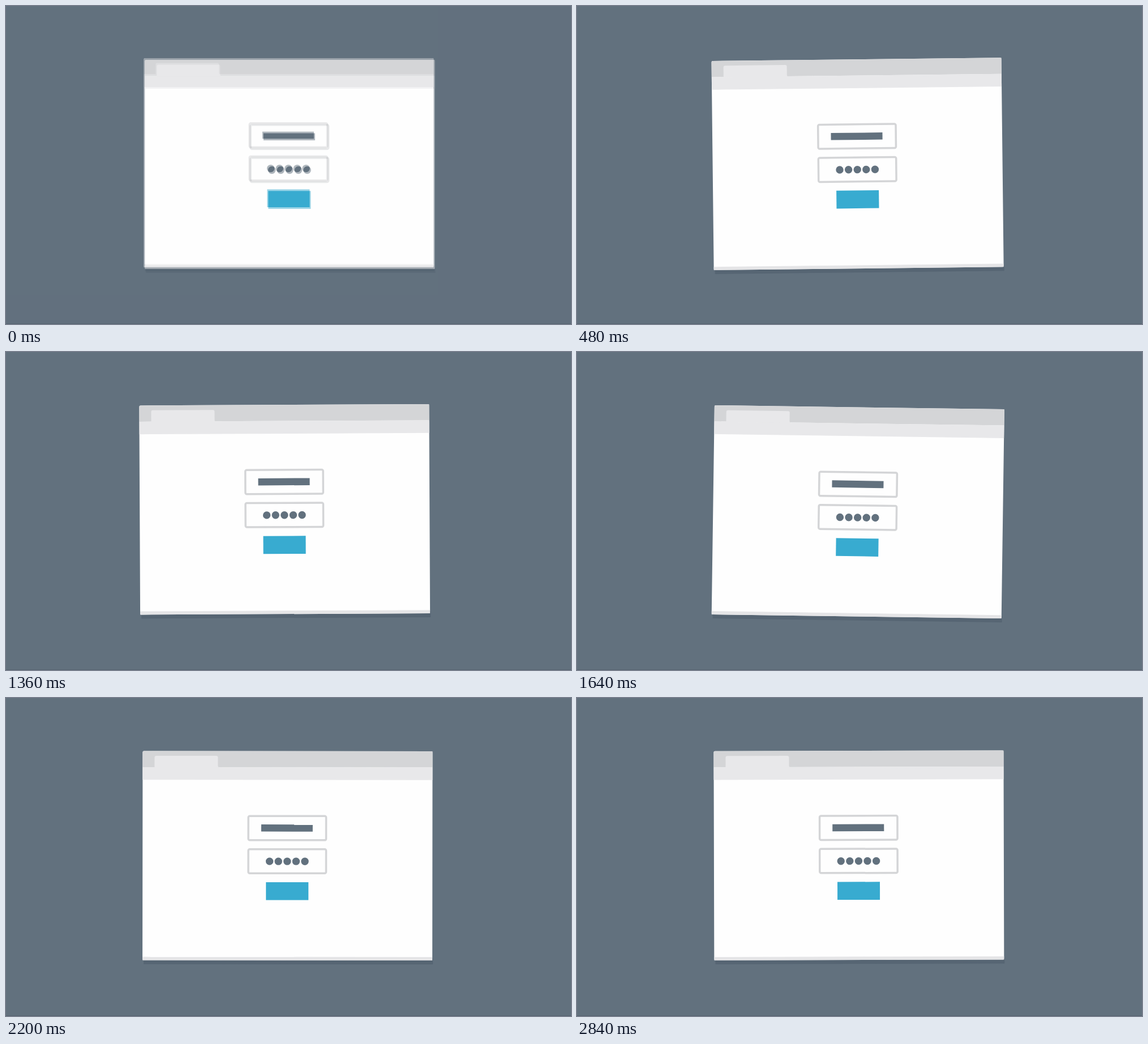
An HTML page for the animation above (2.88 s loop, 998 by 561 pixels).

```html
<!DOCTYPE html>
<html lang="en">
<head>
<meta charset="utf-8">
<title>Shaking login window</title>
<style>
  html, body { margin: 0; width: 100%; height: 100%; overflow: hidden; background: #62717e; }
  svg { display: block; width: 100vw; height: 100vh; }
</style>
</head>
<body>
<svg id="stage" viewBox="0 0 998 561"></svg>
<script>
const LOOP = 2880, STEP = 40;
const SLATE = '#62717e', BAR = '#d4d5d7', PALE = '#e8e8ea', BLUE = '#38abd0';

const rect = (x, y, w, h, fill, extra = '') =>
  `<rect x="${x}" y="${y}" width="${w}" height="${h}" fill="${fill}" ${extra}/>`;

const field = y =>
  rect(-69.2, y + 1.75, 137.4, 42.5, 'none', `rx="2.5" stroke="${BAR}" stroke-width="3.5"`);

const dots = [0, 1, 2, 3, 4].map(i =>
  `<circle cx="${-31.7 + 15.6 * i}" cy="10" r="6.7" fill="${SLATE}"/>`).join('');

// The window is drawn around its own centre.
const windowArt =
  rect(-254, 180, 511, 11.5, '#566573') +
  rect(-256, -184.5, 512, 369, '#fefefe', 'rx="2"') +
  `<path d="M-256-156V-181.5q0-3 3-3H256V-156z" fill="${BAR}"/>` +
  rect(-256, -156, 512, 22.3, PALE) +
  `<path d="M-235-155V-173q0-3 3-3h106q3 0 3 3v15q0 2 3 3z" fill="${PALE}"/>` +
  rect(-256, 178.7, 512, 5.8, '#e5e5e7') +
  field(-71.6) + field(-13.2) +
  rect(-46.5, -55, 91, 12.5, SLATE) + dots +
  rect(-38, 46.8, 75, 31.6, BLUE);

const layer = `<g>${rect(0, 0, 998, 561, SLATE)}<g>${windowArt}</g></g>`;
const stage = document.getElementById('stage');
stage.innerHTML = layer + layer + rect(0, 560, 998, 1, '#56636f');
const [main, ghost] = stage.children;

// Resting poses: time, centre x, centre y, degrees.
const poses = [
  [0, 499.3, 276.6, 0],
  [480, 495.6, 278.6, -0.64],
  [880, 502.2, 278.7, -0.52],
  [1360, 492.2, 277.7, -0.27],
  [1920, 495.5, 276.8, 0.29],
  [2440, 497.9, 277.8, 0.66],
  [2800, 495.5, 276.2, 0.2],
  [2840, 497.9, 277.6, -0.14]
];

// Wiggle keys fill the gaps between the poses.
const keys = [];
poses.forEach((pose, i) => {
  keys.push(pose);
  const next = poses[i + 1];
  if (!next) return;
  const gap = next[0] - pose[0], parts = Math.round(gap / 130);
  for (let k = 1; k < parts; k++) {
    const n = keys.length;
    keys.push([
      pose[0] + gap * k / parts,
      497.8 + 7 * Math.sin(2.4 * n),
      277.8 + 5 * Math.sin(2.9 * n + 1),
      0.8 * Math.sin(1.9 * n + 2)
    ]);
  }
});

const spline = (a, b, c, d, u) =>
  b + u / 2 * (c - a + u * (2 * a - 5 * b + 4 * c - d + u * (3 * (b - c) + d - a)));

function poseAt(t) {
  const last = keys.length - 1;
  let i = 0;
  while (i < last - 1 && keys[i + 1][0] <= t) i++;
  const b = keys[i], c = keys[i + 1];
  const a = keys[Math.max(i - 1, 0)], d = keys[Math.min(i + 2, last)];
  const u = Math.min((t - b[0]) / (c[0] - b[0]), 1);
  return [1, 2, 3].map(n => spline(a[n], b[n], c[n], d[n], u));
}

function place(node, x, y, angle) {
  node.lastElementChild.setAttribute('transform', `translate(${x} ${y}) rotate(${angle})`);
}

function draw(now) {
  const t = Math.floor(now % LOOP / STEP) * STEP;
  const [x, y, angle] = poseAt(t);
  place(main, x, y, angle);
  // The first step of each loop is a half-and-half double exposure.
  place(ghost, x + 2, y + 2.9, angle);
  ghost.setAttribute('opacity', t === 0 ? 0.5 : 0);
}

let start;
function tick(now) {
  start ??= now;
  draw(now - start);
  requestAnimationFrame(tick);
}
draw(0);
requestAnimationFrame(tick);
</script>
</body>
</html>
```
